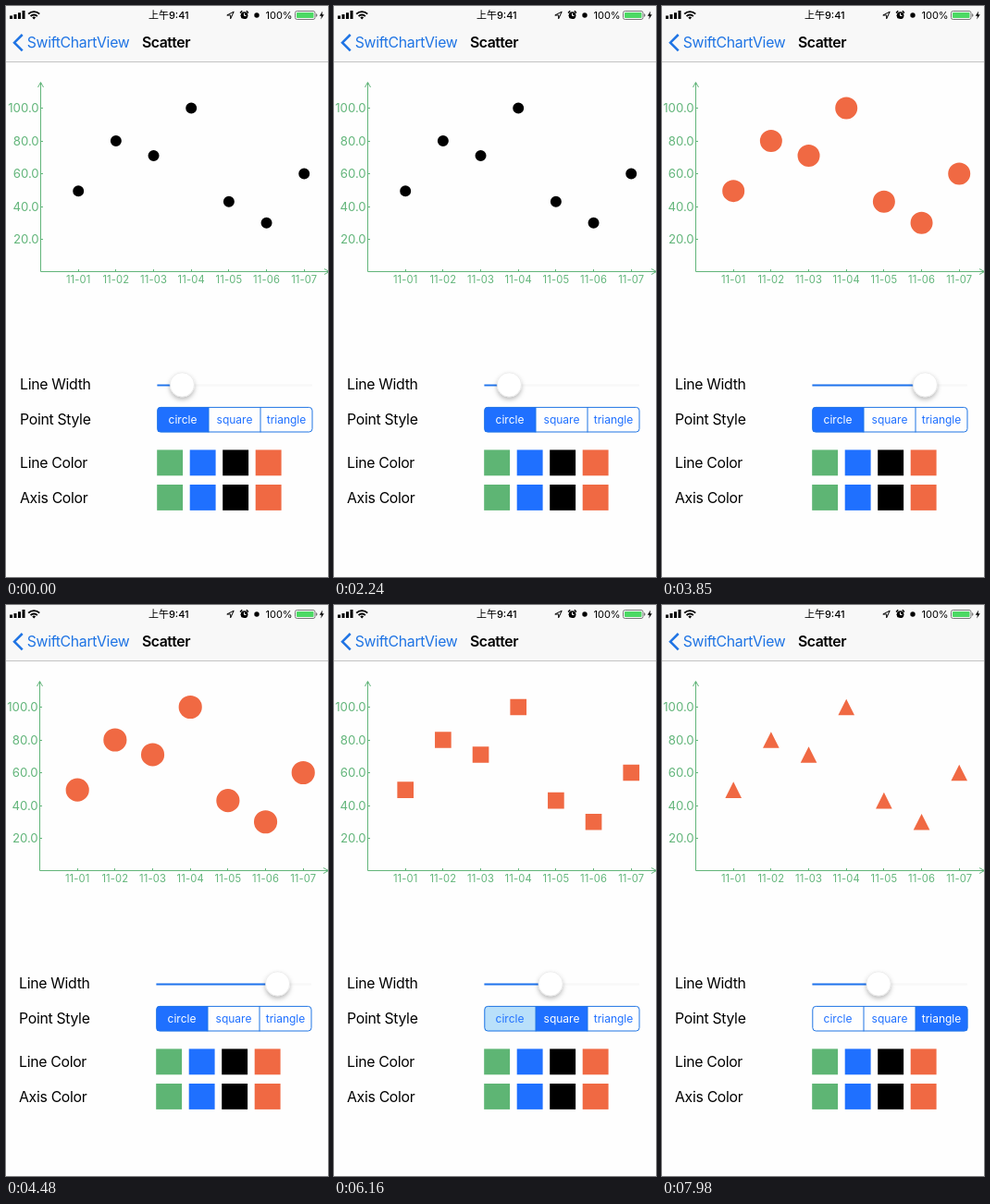
An HTML page for the animation above (8000 ms loop, 348 by 618 pixels).

```html
<!DOCTYPE html>
<html lang="en">
<head>
<meta charset="utf-8">
<title>Scatter</title>
<style>
html, body { margin: 0; width: 100%; height: 100%; overflow: hidden; background: #fff; }
svg { display: block; width: 100vw; height: 100vh; font-family: Inter, "Noto Sans CJK SC", "Noto Sans CJK", sans-serif; }
.body { font-size: 15.8px; letter-spacing: -.3px; }
.title { font-weight: 600; letter-spacing: -.46px; }
.status { font-size: 11px; font-weight: 500; }
.axis { font-size: 13.2px; fill: #62b57a; }
.date { font-size: 11.2px; letter-spacing: .15px; fill: #62b57a; text-anchor: middle; }
.segment { font-size: 12px; text-anchor: middle; }
</style>
</head>
<body>
<svg viewBox="0 0 348 618">
  <defs>
    <filter id="shadow" x="-50%" y="-50%" width="200%" height="200%">
      <feDropShadow dx="0" dy="2.6" stdDeviation="2.4" flood-color="#000" flood-opacity=".28"/>
    </filter>
    <clipPath id="control"><rect x="162.4" y="434" width="168" height="27.4" rx="3.5"/></clipPath>
  </defs>

  <rect width="348" height="618" fill="#fefefe"/>
  <g id="content">
    <g fill="none" stroke="#62b57a">
      <path id="axes" d="M36.5 287.5V83M33.5 88L36.5 82.5L39.5 88M36.5 287.5H348M343 284.5L348.5 287.5L343 290.5"/>
    </g>
    <g id="labels"></g>
    <path id="points"/>
    <g class="body">
      <text x="14" y="415">Line Width</text>
      <text x="14" y="453">Point Style</text>
      <text x="14" y="500">Line Color</text>
      <text x="14" y="538">Axis Color</text>
    </g>
    <path d="M162.4 410.5H330" stroke="#f8f8f8" stroke-width="1.9"/>
    <path id="track" stroke="#1f74ee" stroke-width="1.9"/>
    <circle id="thumb" cy="409.9" r="13.1" fill="#fff" stroke="#ddd" stroke-width=".5" filter="url(#shadow)"/>
    <g id="segments" clip-path="url(#control)"></g>
    <g fill="none" stroke="#1f74e4">
      <path d="M218 434V461.4M274 434V461.4"/>
      <rect x="162.8" y="434.4" width="167.2" height="26.6" rx="3.5"/>
    </g>
    <g id="swatches"></g>
  </g>

  <rect width="348" height="60" fill="#f8f8f8"/>
  <path d="M0 60.5H348" stroke="#c4c4c4"/>
  <path d="M17.7 31L9 39.7L17.7 48.4" fill="none" stroke="#1f74e4" stroke-width="2.5"/>
  <text class="body" x="22.7" y="45.3" fill="#1f74e4">SwiftChartView</text>
  <text class="body title" x="147" y="45.3">Scatter</text>

  <g class="status">
    <path d="M4 10.5h3v3.5h-3zM8.5 9h3v5h-3zM13 7.3h3v6.7h-3zM17.5 5h3v9h-3z"/>
    <g fill="none" stroke="#000" stroke-width="1.9">
      <path d="M24.2 8.6A8.4 8.4 0 0 1 36.2 8.6M26.6 11.1A5 5 0 0 1 33.8 11.1"/>
    </g>
    <path d="M28.3 12.4A2.7 2.7 0 0 1 32.1 12.4L30.2 14.4Z"/>
    <text x="175.8" y="14" text-anchor="middle">上午9:41</text>
    <path d="M238.8 10L246.2 6.2L242.7 13.8V10Z" fill="none" stroke="#000"/>
    <circle cx="257.5" cy="10.2" r="3.9"/>
    <path d="M257.5 7.8V10.5H259.5" fill="none" stroke="#fff"/>
    <path d="M253 7.4L255.2 5.3M262 7.4L259.8 5.3" stroke="#000" stroke-width="1.4"/>
    <circle cx="271" cy="10" r="2.7"/>
    <text x="280.5" y="14" font-weight="400">100%</text>
    <rect x="312.5" y="5.5" width="21.5" height="9" rx="2" fill="none" stroke="#777"/>
    <rect x="314" y="7" width="18.5" height="6" rx=".8" fill="#4cd964"/>
    <path d="M335 8.3Q336.5 8.5 336.5 10T335 11.7Z" fill="#777"/>
    <path d="M342.2 5.5L338.8 10.7H341L340.2 14.5L343.7 9.2H341.5Z"/>
  </g>
</svg>

<script>
const LOOP = 8000;
const BLUE = '#1f70ff', ORANGE = '#f06943';
const SVG_NS = 'http://www.w3.org/2000/svg';
const byId = id => document.getElementById(id);

function add(parent, tag, attributes, text = '') {
  const node = document.createElementNS(SVG_NS, tag);
  set(node, attributes);
  node.textContent = text;
  return parent.appendChild(node);
}

function set(node, attributes) {
  for (const name in attributes) node.setAttribute(name, attributes[name]);
}

const pointX = i => 77.2 + i * 40.67;
const valueY = value => 288 - value * 1.775;
const values = [49.5, 80, 71, 100, 43, 30, 60];

let ticks = '';
for (let value = 20; value <= 100; value += 20) {
  const y = valueY(value);
  ticks += `M36.5 ${Math.floor(y) + .5}h2.5`;
  add(byId('labels'), 'text', { class: 'axis', x: 34.7, y: y + 4.5, 'text-anchor': 'end' }, value.toFixed(1));
}
values.forEach((_, i) => {
  ticks += `M${Math.floor(pointX(i)) + .5} 287.5v-2.5`;
  add(byId('labels'), 'text', { class: 'date', x: pointX(i), y: 300.3 }, `11-0${i + 1}`);
});
byId('axes').setAttribute('d', byId('axes').getAttribute('d') + ticks);

for (const y of [480.4, 518])
  ['#5eb574', BLUE, '#000', ORANGE].forEach((fill, i) =>
    add(byId('swatches'), 'rect', { x: 162.2 + i * 35.5, y, width: 27.9, height: 27.9, fill }));

const segments = ['circle', 'square', 'triangle'].map((name, i) => ({
  box: add(byId('segments'), 'rect', { x: 162 + i * 56, y: 434, width: i < 2 ? 56 : 57, height: 27.5 }),
  label: add(byId('segments'), 'text', { class: 'segment', x: 190 + i * 56, y: 452 }, name)
}));

const shapes = [
  (x, y, r) => `M${x - r} ${y}a${r} ${r} 0 1 1 ${2 * r} 0a${r} ${r} 0 1 1 ${-2 * r} 0Z`,
  (x, y, r) => `M${x - r} ${y - r}h${2 * r}v${2 * r}h${-2 * r}Z`,
  (x, y, r) => `M${x} ${y - r}l${r} ${2 * r}h${-2 * r}Z`
];

// Time and thumb position pairs for the slider drag.
const drag = [[3360, 189], [3850, 284], [4130, 302], [4400, 296], [5040, 232.5], [5180, 233.7]];

function thumbAt(time) {
  if (time <= drag[0][0]) return drag[0][1];
  for (let i = 1; i < drag.length; i++) {
    const [t0, x0] = drag[i - 1], [t1, x1] = drag[i];
    if (time <= t1) {
      const u = (time - t0) / (t1 - t0);
      return x0 + (x1 - x0) * u * u * (3 - 2 * u);
    }
  }
  return drag[drag.length - 1][1];
}

const selectedAt = [0, 6090, 7140];
const FADE = 250;

function paintSegments(time, style) {
  segments.forEach(({ box, label }, i) => {
    const selected = i === style;
    const fading = i === style - 1 ? Math.max(0, 1 - (time - selectedAt[style]) / FADE) : 0;
    set(box, { fill: selected ? BLUE : '#9fd6fa', 'fill-opacity': selected ? 1 : fading });
    set(label, { fill: selected ? '#fff' : BLUE });
  });
}

function draw(time) {
  const x = thumbAt(time);
  const radius = 6 + (x - 189) * 6 / 95;
  const style = time < selectedAt[1] ? 0 : time < selectedAt[2] ? 1 : 2;

  set(byId('content'), { transform: `translate(${time < 140 ? 1 : 0} 0)` });
  set(byId('track'), { d: `M162.4 410.5H${x}` });
  set(byId('thumb'), { cx: x + .3 });
  set(byId('points'), {
    d: values.map((value, i) => shapes[style](pointX(i), valueY(value), radius)).join(''),
    fill: time < 2380 ? '#000' : ORANGE
  });
  paintSegments(time, style);
}

const start = performance.now();
function tick() {
  draw((performance.now() - start) % LOOP);
  requestAnimationFrame(tick);
}
tick();
</script>
</body>
</html>
```
